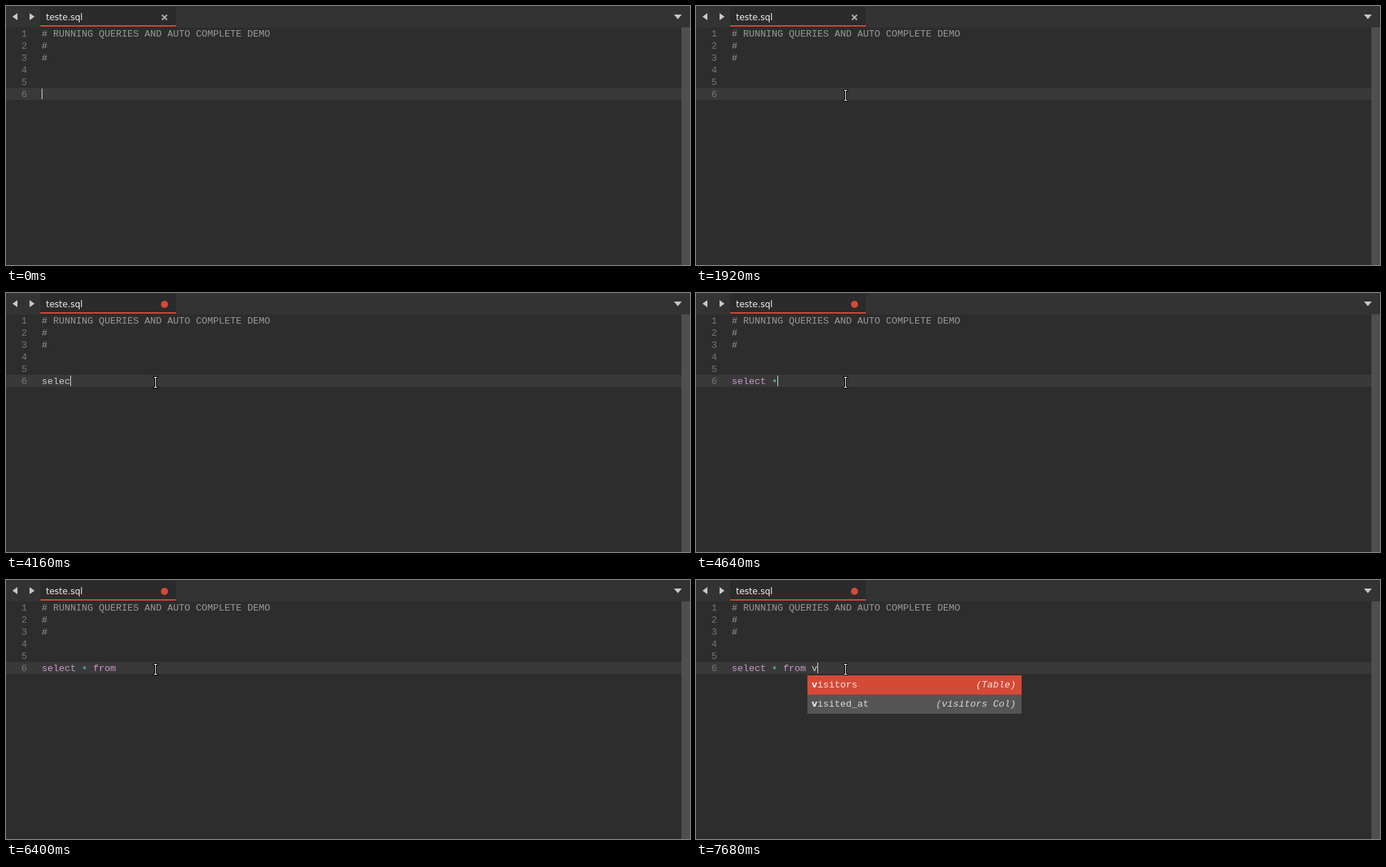
Animation, 958 px wide and 364 px high, one loop 8 s. Source, as an HTML page:

```html
<!DOCTYPE html>
<html lang="en">
<head>
<meta charset="utf-8">
<title>Editor demo</title>
<style>
  html, body { margin: 0; width: 100%; height: 100%; overflow: hidden; background: #2d2d2d; }
  svg { display: block; width: 958px; height: 364px; }
  text { font: 13.333px "Liberation Mono", monospace; white-space: pre; fill: #ccc; }
  .tab { font: 12px "DejaVu Sans", sans-serif; fill: #f4f4f4; }
  .comment { fill: #999; }
  .number { fill: #777; text-anchor: end; }
  .keyword { fill: #c9c; }
  .operator { fill: #6cc; }
  .hint { font-style: italic; text-anchor: end; }
  .match { font-weight: bold; fill: #fff; }
  .chosen { fill: #fbe9e6; }
  .other { fill: #d8d8d8; }
</style>
</head>
<body>
<svg viewBox="0 0 958 364">
  <rect width="958" height="364" fill="#2d2d2d"/>
  <rect width="958" height="30" fill="#333"/>
  <rect x="48" y="1" width="190" height="29" fill="#2b2b2b"/>
  <rect x="48" y="27" width="190" height="2" fill="#d64937"/>
  <path d="M16 10v10l-7-5zM33 10v10l7-5zM935.5 12h11l-5.500 6.500z" fill="#c8c8c8"/>
  <text class="tab" x="56" y="20">teste.sql</text>
  <path id="close" d="M218.500 12.500l7 7m0-7l-7 7" stroke="#b0b0b0" stroke-width="2"/>
  <circle id="dirty" cx="222" cy="16" r="5" fill="#d64937"/>
  <rect y="115" width="946" height="17" fill="#393939"/>
  <rect x="946" y="30" width="12" height="334" fill="#4f4f4f"/>
  <g id="lines"></g>
  <g id="query"></g>
  <rect id="caret" y="116" width="1" height="15" fill="#d8d8d8"/>
  <g id="popup">
    <rect x="156" y="134" width="300" height="27" fill="#d64937"/>
    <rect x="156" y="161" width="300" height="27" fill="#555"/>
    <text class="chosen" x="162" y="151"><tspan class="match">v</tspan>isitors</text>
    <text class="chosen hint" x="448" y="151">(Table)</text>
    <text class="other" x="162" y="178"><tspan class="match">v</tspan>isited_at</text>
    <text class="other hint" x="448" y="178">(visitors Col)</text>
  </g>
  <g id="mouse" fill="none" stroke-linecap="square">
    <path d="M1.500 1.500h4m-2 0v14m-2 0h4" stroke="#000" stroke-width="3"/>
    <path d="M1.500 1.500h4m-2 0v14m-2 0h4" stroke="#fff" stroke-width="1"/>
  </g>
</svg>
<script>
const LOOP = 8000, LEFT = 50, CHAR = 8, ROW = 17, BASELINE = 43;
const el = id => document.getElementById(id);

// [start ms, typed text, caret visible]
const typing = [
  [0, '', 1], [800, '', 0], [1120, '', 1], [1920, '', 0], [2240, '', 1],
  [2720, 's', 1], [3520, 's', 0], [3840, 'sel', 1], [4000, 'sele', 1],
  [4160, 'selec', 1], [4320, 'select', 1], [4480, 'select ', 1],
  [4640, 'select *', 1], [4800, 'select * ', 1], [4960, 'select * fr', 1],
  [5120, 'select * from', 1], [5600, 'select * from ', 1],
  [6400, 'select * from ', 0], [6560, 'select * from v', 1],
  [7360, 'select * from v', 0], [7680, 'select * from v', 1]
];
// [start ms, left, top]
const pointer = [[0, -20, 0], [320, 265, 132], [480, 220, 99], [640, 220, 98], [800, 206, 117]];

const classes = { select: 'keyword', from: 'keyword', '*': 'operator' };

function addText(parent, x, y, content, className = '') {
  const node = document.createElementNS('http://www.w3.org/2000/svg', 'text');
  node.setAttribute('x', x);
  node.setAttribute('y', y);
  node.setAttribute('class', className);
  node.textContent = content;
  parent.append(node);
}

const comments = ['# RUNNING QUERIES AND AUTO COMPLETE DEMO', '#', '#'];
for (let i = 0; i < 6; i++) {
  const y = BASELINE + i * ROW;
  addText(el('lines'), 29.5, y, i + 1, 'number');
  if (comments[i]) addText(el('lines'), LEFT, y, comments[i], 'comment');
}

function drawQuery(text) {
  el('query').replaceChildren();
  for (const { 0: word, index } of text.matchAll(/\S+/g)) {
    const y = BASELINE + 5 * ROW + (word === '*' ? 2 : 0);
    addText(el('query'), LEFT + index * CHAR, y, word, classes[word]);
  }
}

const show = (id, visible) => el(id).setAttribute('visibility', visible ? 'visible' : 'hidden');
const stepAt = (steps, time) => steps.findLast(step => step[0] <= time);

let current;
function render() {
  const time = performance.now() % LOOP;
  const [, x, y] = stepAt(pointer, time);
  el('mouse').setAttribute('transform', `translate(${x} ${y})`);

  const step = stepAt(typing, time);
  if (step !== current) {
    current = step;
    const [, text, caretOn] = step;
    drawQuery(text);
    el('caret').setAttribute('x', LEFT + text.length * CHAR);
    show('caret', caretOn);
    show('close', !text);
    show('dirty', text);
    show('popup', text.endsWith('v'));
  }
  requestAnimationFrame(render);
}
render();
</script>
</body>
</html>
```
